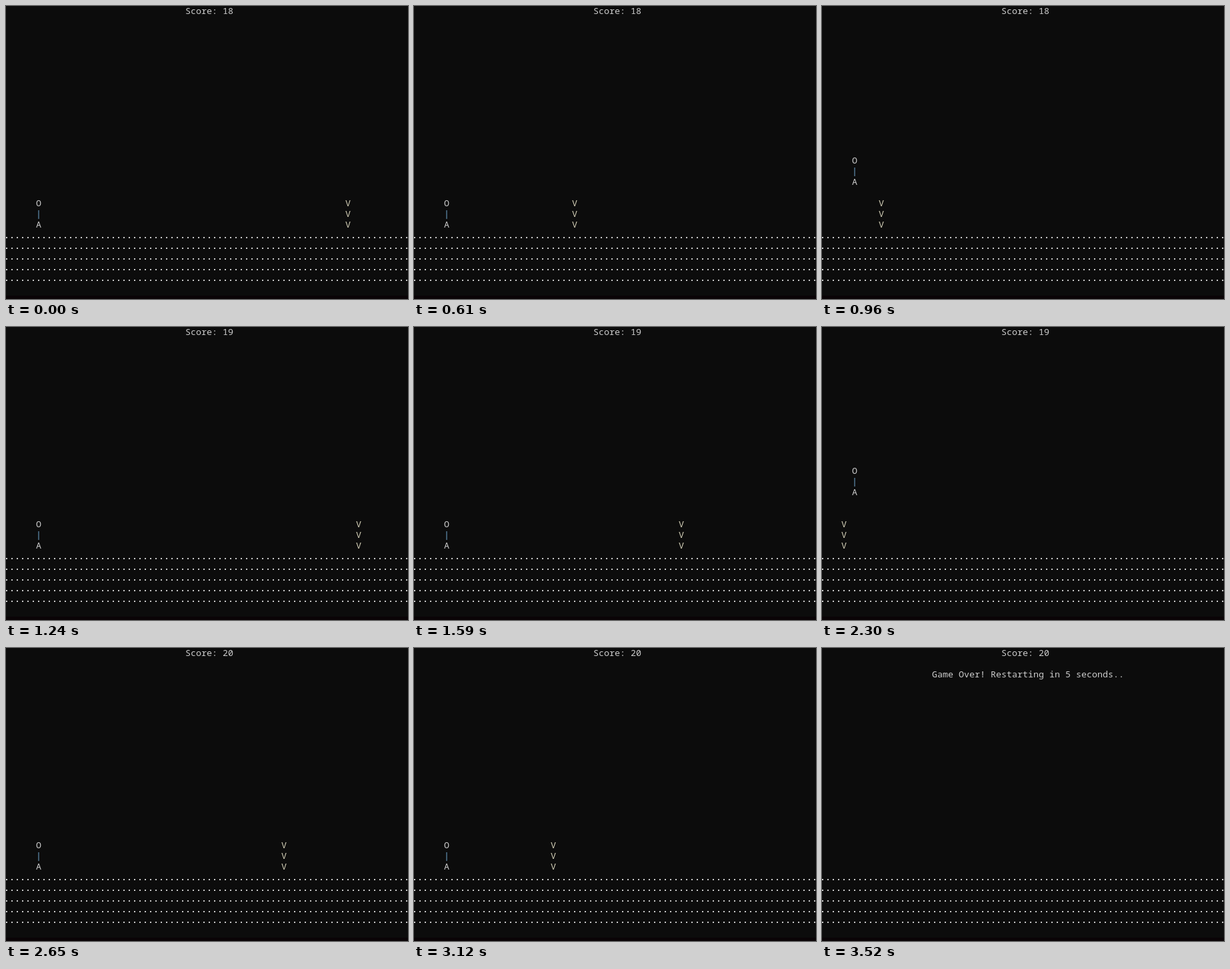
These frames come from a looping animation (603 px wide and 439 px high, 8 s). An HTML page with a canvas:

```html
<!DOCTYPE html>
<html>
<head>
<meta charset="utf-8">
<style>
html, body { margin: 0; width: 100%; height: 100%; overflow: hidden; background: #0c0c0c; }
canvas { display: block; }
</style>
</head>
<body>
<canvas id="stage" width="603" height="439"></canvas>
<script>
const ctx = document.getElementById('stage').getContext('2d');
const LOOP = 8000, GAME_OVER = 3520;
const PLAYER_COL = 6, GROUND_ROW = 20;

// The game redraws about every 69 ms, evenly spaced between these times.
const BEATS = [0, 610, 1240, 1950, 2650, 3120, GAME_OVER];

// Obstacle runs: [time, column] points.
const RUNS = [
  [[0, 64], [610, 30], [1170, 0]],
  [[1240, 66], [1950, 26], [2370, 0]],
  [[2440, 65], [2510, 61], [2650, 52], [3120, 26], [GAME_OVER, 3.2]]
];
const JUMPS = [870, 2090], JUMP_TIME = 365, JUMP_ROWS = 5;

function snap(t) {
  const i = BEATS.findIndex(b => b > t);
  const start = BEATS[i - 1], span = BEATS[i] - start;
  const steps = Math.round(span / 69);
  return start + Math.floor((t - start) / span * steps + 1e-6) * span / steps;
}

function interpolate(points, t) {
  let i = 1;
  while (i < points.length - 1 && t > points[i][0]) i++;
  const [t0, v0] = points[i - 1], [t1, v1] = points[i];
  return v0 + (v1 - v0) * Math.min(1, (t - t0) / (t1 - t0));
}

function jumpHeight(t) {
  const start = JUMPS.find(j => t >= j && t < j + JUMP_TIME);
  if (start === undefined) return 0;
  const p = (t - start) / JUMP_TIME;
  return Math.round(4 * JUMP_ROWS * p * (1 - p));
}

function print(text, col, row, color = '#cccccc') {
  ctx.fillStyle = color;
  ctx.fillText(text, col * 8 - 3, row * 16 + 12);
}

function drawGround() {
  ctx.fillStyle = '#cccccc';
  for (let row = 0; row < 5; row++)
    for (let x = 0; x < 603; x += 8) ctx.fillRect(x, 346 + row * 16, 2, 2);
}

function drawGame(t) {
  const run = RUNS.findLastIndex(r => t >= r[0][0] - 0.5);
  const col = Math.round(interpolate(RUNS[run], t));
  const feet = GROUND_ROW - jumpHeight(t);
  print('Score: ' + (18 + run), 34, 0);
  print('O', PLAYER_COL, feet - 2);
  print('|', PLAYER_COL, feet - 1, '#73add6');
  print('A', PLAYER_COL, feet);
  for (let i = 0; i < 3; i++) print('V', col, GROUND_ROW - i, '#d0ccb4');
}

function draw(t) {
  ctx.fillStyle = '#0c0c0c';
  ctx.fillRect(0, 0, 603, 439);
  ctx.fillStyle = '#0a0406';
  ctx.fillRect(0, 434, 603, 5);
  ctx.font = '13.3333px "Noto Sans Mono", "DejaVu Sans Mono", monospace';
  drawGround();
  if (t < GAME_OVER) {
    drawGame(snap(t));
  } else {
    print('Score: 20', 34, 0);
    print('Game Over! Restarting in 5 seconds..', 21, 2);
  }
}

const began = performance.now();
function tick() {
  draw((performance.now() - began) % LOOP);
  requestAnimationFrame(tick);
}
tick();
</script>
</body>
</html>
```
